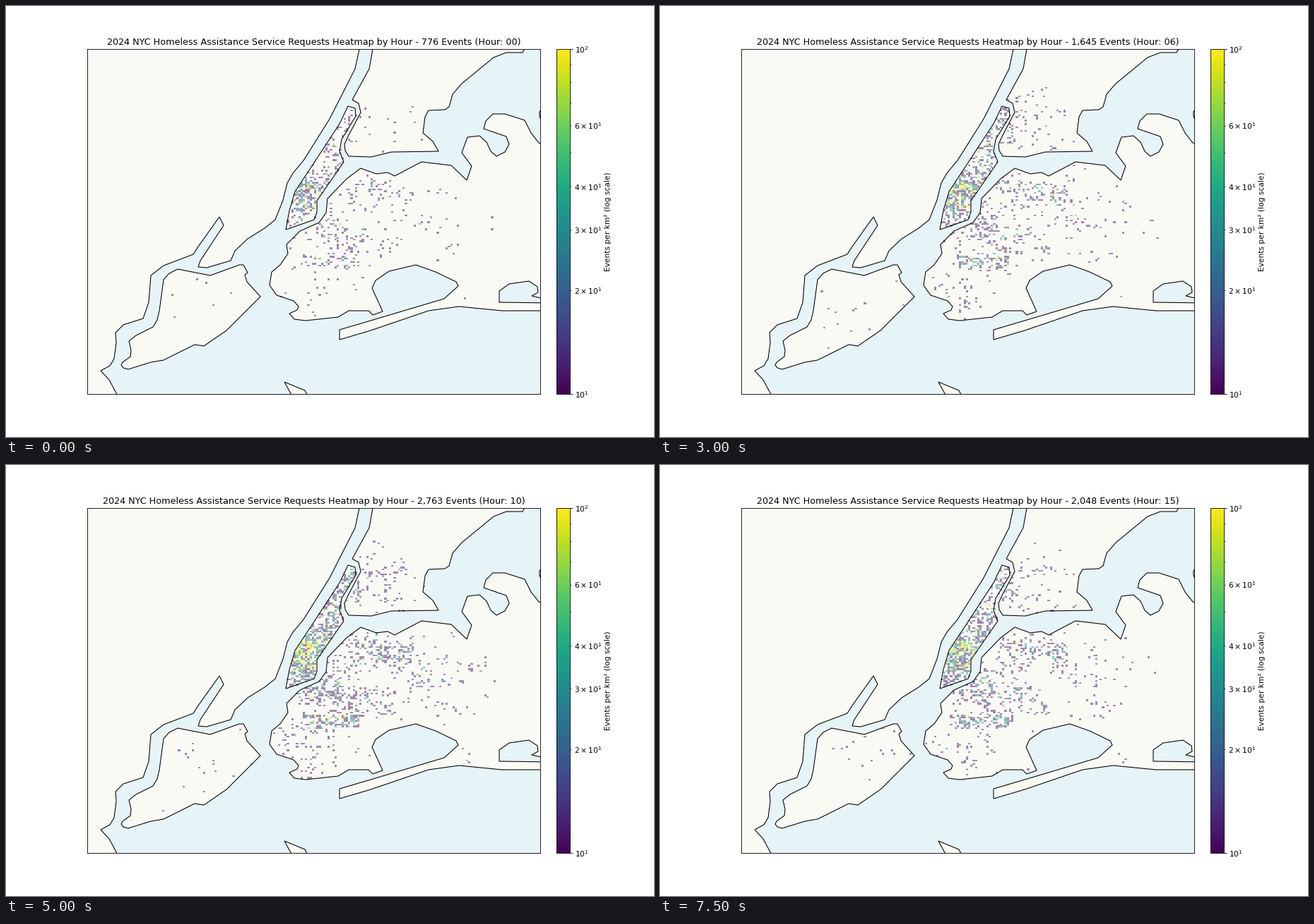
These frames come from a looping animation (917x611 px, 8000 ms). A matplotlib script:

```python
import numpy as np
import matplotlib.pyplot as plt
from matplotlib.animation import FuncAnimation
from matplotlib.cm import ScalarMappable
from matplotlib.colors import LogNorm
from matplotlib.patches import Polygon
from matplotlib.path import Path

W, H = 917, 611
DPI = 76.42
WATER, LAND = "#e6f3f7", "#fafaf5"
LEFT, BOTTOM, WIDTH, HEIGHT = 0.125, 0.1, 0.6995, 0.8
X0, X1 = LEFT * W, (LEFT + WIDTH) * W          # map window, in stage pixels
Y0, Y1 = (1 - BOTTOM - HEIGHT) * H, (1 - BOTTOM) * H
BINS, BLOCK = 200, 8
EVENT_DENSITY = 11.5                           # events per km² for one event in a cell

TOTALS = [776, 1043, 996, 871, 812, 1078, 1645, 2316,
          2894, 3097, 2763, 2448, 2297, 2174, 2102, 2048]

# Key points of each shore
MAINLAND = [
    (100, 40), (505, 40), (500, 61), (494, 89), (458, 160), (421, 219), (406, 237),
    (398, 251), (392, 275), (381, 303), (366, 315), (342, 330), (324, 347), (318, 361),
    (284, 371), (272, 370), (275, 361), (308, 311), (302, 299), (272, 341), (265, 352),
    (223, 368), (205, 382), (202, 420), (194, 443), (166, 452), (155, 463), (156, 477),
    (153, 500), (147, 510), (134, 517), (146, 530), (162, 560), (100, 560)]
STATEN = [
    (243, 373), (231, 379), (223, 388), (217, 432), (214, 445), (208, 455), (184, 467),
    (174, 475), (177, 488), (176, 497), (165, 505), (163, 509), (166, 513), (173, 515),
    (205, 505), (223, 502), (267, 480), (280, 482), (312, 460), (360, 412), (341, 391),
    (338, 381), (342, 378), (336, 367), (330, 367), (289, 382)]
MANHATTAN = [
    (396, 317), (401, 290), (409, 263), (440, 216), (472, 167), (484, 142), (494, 145),
    (495, 156), (475, 189), (472, 206), (478, 221), (440, 276), (440, 292), (436, 303)]
BRONX = [
    (523, 40), (519, 61), (514, 89), (490, 133), (499, 138), (502, 151), (485, 183),
    (479, 196), (480, 205), (485, 213), (517, 214), (545, 207), (612, 206), (604, 192),
    (590, 180), (593, 157), (598, 148), (621, 147), (627, 143), (632, 125), (645, 110),
    (690, 73), (708, 66), (731, 66), (738, 53), (738, 40)]
NORTH_SHORE = [
    (373, 396), (376, 377), (388, 367), (399, 351), (397, 338), (416, 319), (443, 307),
    (453, 293), (455, 273), (482, 245), (502, 230), (524, 238), (540, 236), (550, 241),
    (588, 221), (630, 226), (652, 247), (659, 227), (645, 208), (653, 186), (670, 184),
    (680, 193), (686, 206), (694, 213), (706, 207), (712, 196), (708, 185), (676, 174),
    (679, 163), (689, 153), (706, 153), (734, 162), (743, 180), (754, 194), (770, 200)]
SOUTH_SHORE = [
    (770, 417), (744, 411), (753, 406), (752, 398), (740, 390), (712, 394), (698, 404),
    (698, 420), (770, 421), (770, 432), (702, 432), (641, 426), (598, 432), (516, 460),
    (472, 473), (472, 459), (516, 446), (620, 415), (640, 397), (637, 391), (608, 377),
    (580, 367), (542, 376), (523, 389), (518, 400), (533, 433), (519, 438), (513, 432),
    (485, 432), (470, 441), (424, 446), (408, 444), (401, 436), (412, 431), (414, 426),
    (407, 418), (383, 410)]
LONG_ISLAND = NORTH_SHORE + SOUTH_SHORE
HOOK = [(394, 533), (423, 545), (428, 555), (406, 555)]
EAST_TIP = [(757, 147), (755, 150), (755, 156), (757, 162), (765, 155)]

# Outer districts: x, y, spread x, spread y, weight
HUBS = [(518, 168, 28, 22, 90), (520, 262, 28, 11, 75), (595, 300, 42, 28, 75),
        (465, 328, 30, 24, 200), (425, 400, 34, 28, 55), (280, 425, 50, 40, 8),
        (655, 412, 5, 4, 3)]


def bump(u, center, spread):
    return np.exp(-((u - center) / spread) ** 2 / 2)


def event_share():
    """Chance of an event in each cell, with a fixed uneven grain."""
    rng = np.random.default_rng(24)
    step = (np.arange(BINS) + 0.5) / BINS
    x, y = np.meshgrid(X0 + step * (X1 - X0), Y0 + step * (Y1 - Y0))
    cells = np.column_stack([x.ravel(), y.ravel()])

    def inside(shore):
        return Path(shore).contains_points(cells).reshape(x.shape)

    # The island thickens towards midtown and its brightest corner.
    uptown = (312 - y) / 167
    island = 0.4 + 1.7 * bump(uptown, 0.25, 0.1) + 5.5 * bump(x, 427, 4) * bump(y, 257, 5)

    # Blocks of uneven weight gather the outer districts into neighbourhoods.
    blocks = rng.lognormal(-0.3, 0.8, (BINS // BLOCK, BINS // BLOCK))
    outer = sum(1.25 * w / (sx * sy) * bump(x, cx, sx) * bump(y, cy, sy)
                for cx, cy, sx, sy, w in HUBS) * np.kron(blocks, np.ones((BLOCK, BLOCK)))

    share = island * inside(MANHATTAN)
    share += outer * (inside(STATEN) | inside(BRONX) | inside(LONG_ISLAND))
    return (share * rng.lognormal(0, 1.1, share.shape)).ravel()


SHARE = event_share()


def density(hour):
    focus = 1 + 0.12 * bump(hour, 3, 1.2)      # late at night only the hot cells stay busy
    p = SHARE ** focus
    rng = np.random.default_rng(100 + hour)
    counts = rng.multinomial(TOTALS[hour], p / p.sum()).reshape(BINS, BINS)
    return np.ma.masked_equal(counts * EVENT_DENSITY, 0)


fig = plt.figure(figsize=((W + 0.01) / DPI, (H + 0.01) / DPI), dpi=DPI)
ax = fig.add_axes([LEFT, BOTTOM, WIDTH, HEIGHT], facecolor=WATER)
norm = LogNorm(10, 100)

for shore in (MAINLAND, STATEN, MANHATTAN, BRONX, LONG_ISLAND, HOOK, EAST_TIP):
    ax.add_patch(Polygon(shore, facecolor=LAND, edgecolor="none", zorder=1))
    ax.add_patch(Polygon(shore, fill=False, edgecolor="black", linewidth=1, zorder=3))

heat = ax.imshow(density(0), extent=(X0, X1, Y1, Y0), cmap="viridis", norm=norm,
                 alpha=0.5, interpolation="nearest", aspect="auto", zorder=2)
ax.set(xlim=(X0, X1), ylim=(Y1, Y0), xticks=[], yticks=[])
title = ax.set_title("")

cax = fig.add_axes([0.85, BOTTOM, 0.02, HEIGHT])
fig.colorbar(ScalarMappable(norm, "viridis"), cax=cax, label="Events per km² (log scale)")


def update(hour):
    heat.set_data(density(hour))
    title.set_text("2024 NYC Homeless Assistance Service Requests Heatmap by Hour"
                   f" - {TOTALS[hour]:,} Events (Hour: {hour:02d})")
    return heat, title


anim = FuncAnimation(fig, update, frames=len(TOTALS), interval=500,
                     repeat=True, repeat_delay=0)
plt.show()
```
